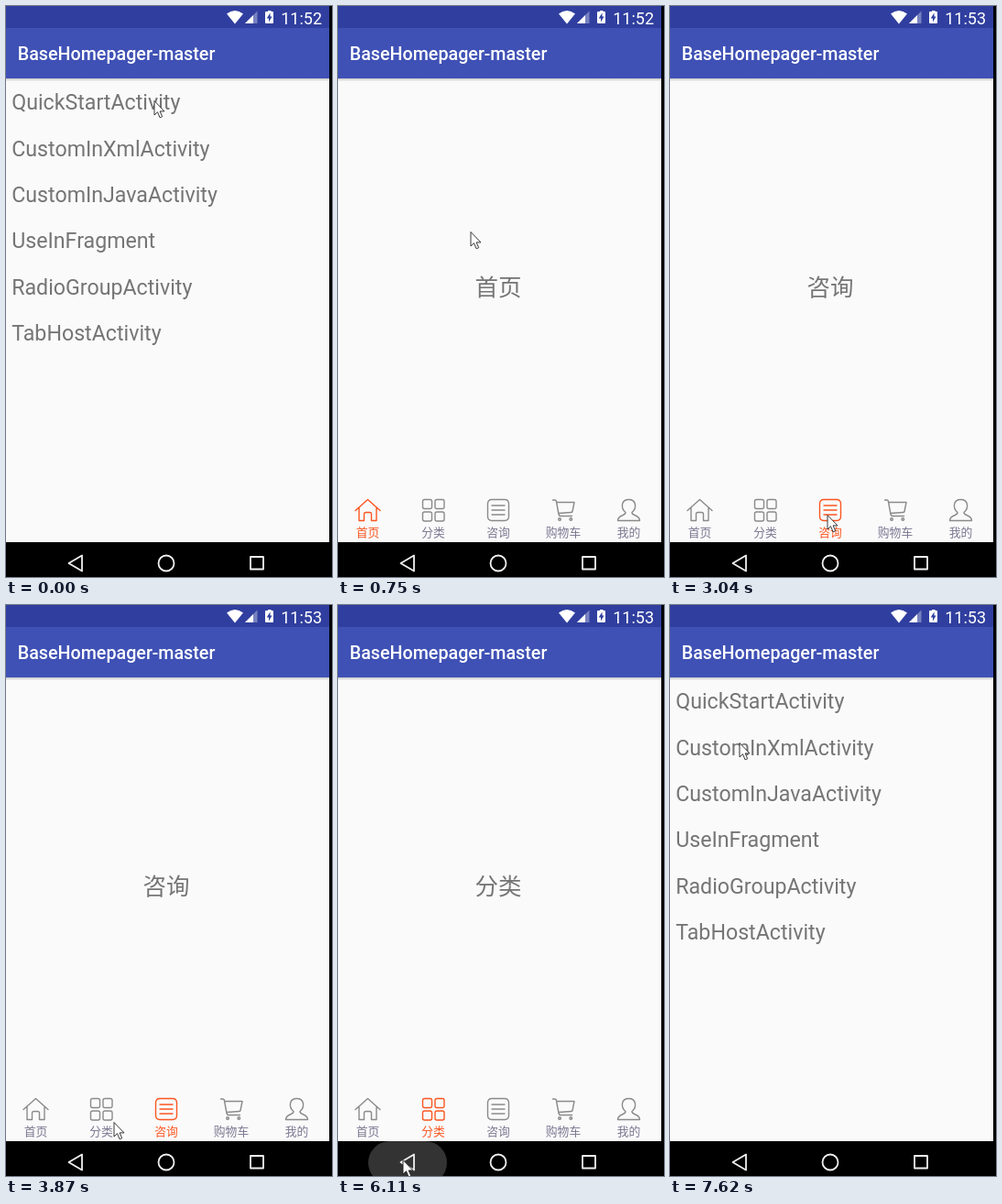
Recreate the animation shown at these times as an HTML page with a canvas. Size 356 by 623 pixels, loop 8 s.

```html
<!DOCTYPE html>
<html lang="zh-CN">
<head>
<meta charset="utf-8">
<title>BaseHomepager-master</title>
<style>
html, body { margin: 0; width: 100%; height: 100%; overflow: hidden; background: #000; }
canvas { display: block; }
</style>
</head>
<body>
<canvas id="stage" width="356" height="623"></canvas>
<script>
const W = 353, H = 623, LOOP = 8000;
const GREY = '#757575', TAB = '#7b7791', ACTIVE = '#fb5620', ICON = '#8a8a8a';
const ROBOTO = 'Roboto, sans-serif';
const CJK = '"Noto Sans CJK SC", "Noto Sans CJK", sans-serif';

const stage = document.getElementById('stage').getContext('2d');
const layer = document.createElement('canvas');
layer.width = W;
layer.height = H;
const page = layer.getContext('2d');

const rows = ['QuickStartActivity', 'CustomInXmlActivity', 'CustomInJavaActivity',
  'UseInFragment', 'RadioGroupActivity', 'TabHostActivity'];

const square = (x, y) => `M${x + 2} ${y}h6q2 0 2 2v6q0 2-2 2h-6q-2 0-2-2v-6q0-2 2-2z`;
// Icon paths are centred on the origin.
const tabs = [
  { name: '首页', x: 32.5, icon: 'M-13.5 .5L0-11.5L13.5 .5M-9.5-2.5V11.5H-4V4.5Q-4 2.5-2 2.5H2Q4 2.5 4 4.5V11.5H9.5V-2.5' },
  { name: '分类', x: 104, icon: square(-11.5, -11.5) + square(2, -11.5) + square(-11.5, 2) + square(2, 2) },
  { name: '咨询', x: 175, icon: 'M-7-11.5H7Q11.5-11.5 11.5-7V7Q11.5 11.5 7 11.5H-7Q-11.5 11.5-11.5 7V-7Q-11.5-11.5-7-11.5zM-7-5H7M-7 0H7M-7 5H7' },
  { name: '购物车', x: 246, icon: 'M-11.5-11H-9Q-8-11-7.7-10L-5 4.5Q-4.6 6.5-3 6.5H9.5M-7.2-8.5H12L10 1.5Q9.8 2.5 8.5 2.5L-5.3 3.5M-5.3 10a1.3 1.3 0 1 0 2.6 0a1.3 1.3 0 1 0-2.6 0M7 10a1.3 1.3 0 1 0 2.6 0a1.3 1.3 0 1 0-2.6 0' },
  { name: '我的', x: 317.5, icon: 'M-3.5 2.5C-9-2-8.5-11.5 0-11.5C8.5-11.5 9-2 3.5 2.5C3 6.5 12 5 12 11.5H-12C-12 5-3 6.5-3.5 2.5z' }
].map(tab => ({ ...tab, icon: new Path2D(tab.icon) }));

const wifi = new Path2D('M250 19.5L241 8.5Q250 1.5 259 8.5z');
const signal = new Path2D('M261 19L274.5 5.5V19z');
const signalOn = new Path2D('M261 19L270 10V19z');
const battery = new Path2D('M286 6V5H289.5V6H291Q292 6 292 7V18Q292 19 291 19H284Q283 19 283 18V7Q283 6 284 6z');
const bolt = new Path2D('M288.5 7.5L284.7 13.5H287V17.5L290.5 11.5H288.5z');
const arrow = new Path2D('M0 .5V16L3.5 12.7L6.1 18.8L8.7 17.7L6.1 11.9H11z');

// Moments at which the screen refreshes.
const ticks = [0, 120, 240, 360, 510, 630, 780, 900, 1050, 1170, 1320,
  1940, 2090, 2210, 2360, 2480, 3040, 3450, 3600, 3720, 3870, 4300,
  4990, 5140, 5290, 5410, 5560, 5710, 6110, 6260, 6380, 6530, 6670,
  6800, 6940, 7080, 7200, 7320, 7470, 7620];

// Pointer stops: time, x, y
const stops = [[0, 162, 103], [360, 162, 103], [1050, 111, 523], [1320, 114, 532],
  [1820, 114, 532], [1940, 117, 533], [2480, 172, 555], [3330, 172, 555],
  [3870, 118, 564], [4870, 118, 563], [4990, 90, 573], [5710, 71, 605],
  [6380, 71, 605], [7080, 77, 117], [7320, 77, 154], [7620, 76, 150], [LOOP, 76, 150]];

function pointerAt(t) {
  const i = stops.findIndex((s, n) => n > 0 && t <= s[0]);
  const [t0, x0, y0] = stops[i - 1], [t1, x1, y1] = stops[i];
  const p = (t - t0) / (t1 - t0), k = p * p * (3 - 2 * p);
  return [Math.round(x0 + (x1 - x0) * k), Math.round(y0 + (y1 - y0) * k)];
}

function rect(c, color, x, y, w, h) {
  c.fillStyle = color;
  c.fillRect(x, y, w, h);
}

function text(c, str, x, y, font, color, align = 'left') {
  c.font = font;
  c.fillStyle = color;
  c.textAlign = align;
  c.fillText(str, x, y);
}

function drawFrame(c) {
  rect(c, '#fafafa', 0, 0, W, 585);
  const shade = c.createLinearGradient(0, 79, 0, 82.5);
  shade.addColorStop(0, 'rgba(0,0,0,.2)');
  shade.addColorStop(1, 'rgba(0,0,0,0)');
  rect(c, shade, 0, 79, W, 4);
  rect(c, '#303f9f', 0, 0, W, 24);
  rect(c, '#3f51b5', 0, 24, W, 55);
  rect(c, '#000', 0, 585, W, H - 585);
  text(c, 'BaseHomepager-master', 12.7, 59, `500 19.7px ${ROBOTO}`, '#fff');
}

function drawList(c) {
  drawFrame(c);
  rows.forEach((row, i) => text(c, row, 6.2, 113.4 + 50.3 * i, `23.2px ${ROBOTO}`, GREY));
}

function drawTabs(c, current) {
  drawFrame(c);
  text(c, tabs[current].name, 175, 315.5, `25.5px ${CJK}`, GREY, 'center');
  tabs.forEach((tab, i) => {
    const on = i === current;
    c.save();
    c.translate(tab.x, 550);
    c.strokeStyle = on ? ACTIVE : ICON;
    c.lineWidth = 1.4;
    c.lineJoin = c.lineCap = 'round';
    c.stroke(tab.icon);
    c.restore();
    text(c, tab.name, tab.x, 578.8, `12.8px ${CJK}`, on ? ACTIVE : TAB, 'center');
  });
}

function drawStatus(c, clock) {
  c.fillStyle = '#fff';
  c.fill(wifi);
  c.fill(signalOn);
  c.fill(battery);
  c.fillStyle = 'rgba(255,255,255,.35)';
  c.fill(signal);
  c.fillStyle = '#303f9f';
  c.fill(bolt);
  text(c, clock, 300.2, 19.5, `18px ${ROBOTO}`, '#fff');
}

function drawNav(c, ripple) {
  if (ripple > 0) {
    c.beginPath();
    c.roundRect(33, 585, 86, 47, 23.5);
    c.fillStyle = `rgba(255,255,255,${0.2 * ripple})`;
    c.fill();
  }
  c.strokeStyle = '#f0f0f0';
  c.lineWidth = 1.8;
  c.lineJoin = 'round';
  c.beginPath();
  c.moveTo(68.5, 608);
  c.lineTo(83, 599.5);
  c.lineTo(83, 616.5);
  c.closePath();
  c.moveTo(183.5, 608);
  c.arc(175, 608, 8.5, 0, Math.PI * 2);
  c.rect(267, 601, 14, 13.5);
  c.stroke();
}

function drawPointer(c, x, y) {
  c.save();
  c.translate(x, y);
  c.fillStyle = '#fff';
  c.strokeStyle = '#222';
  c.lineWidth = 0.9;
  c.fill(arrow);
  c.stroke(arrow);
  c.restore();
}

// The tab page slides up over a dimming list, then later slides down and fades out.
function pageState(t) {
  if (t < 120 || t >= 6530) return { alpha: 0, dy: 0, dim: 0 };
  if (t < 3000) {
    return { alpha: t < 240 ? 0.5 : 1, dy: Math.round(22 * Math.exp((120 - t) / 60)), dim: t < 240 ? 0.15 : 0.3 };
  }
  const p = Math.max(0, (t - 6260) / 250);
  return { alpha: 1 - p, dy: Math.round(50 * p * p), dim: 0 };
}

function render(t) {
  const { alpha, dy, dim } = pageState(t);
  const current = t < 3040 ? 0 : t < 4300 ? 2 : 1;
  const ripple = t < 6110 ? 0 : Math.max(0, 1 - (t - 6110) / 400);

  rect(stage, '#000', 0, 0, 356, H);
  drawList(stage);
  rect(stage, `rgba(0,0,0,${dim})`, 0, 0, W, H);
  if (alpha > 0) {
    drawTabs(page, current);
    stage.globalAlpha = alpha;
    stage.drawImage(layer, 0, dy);
    stage.globalAlpha = 1;
  }
  drawStatus(stage, t < 1940 ? '11:52' : '11:53');
  drawNav(stage, ripple);
  drawPointer(stage, ...pointerAt(t));
}

const start = performance.now();
function loop() {
  const now = (performance.now() - start) % LOOP;
  render(ticks.findLast(t => t <= now));
  requestAnimationFrame(loop);
}
loop();
</script>
</body>
</html>
```
